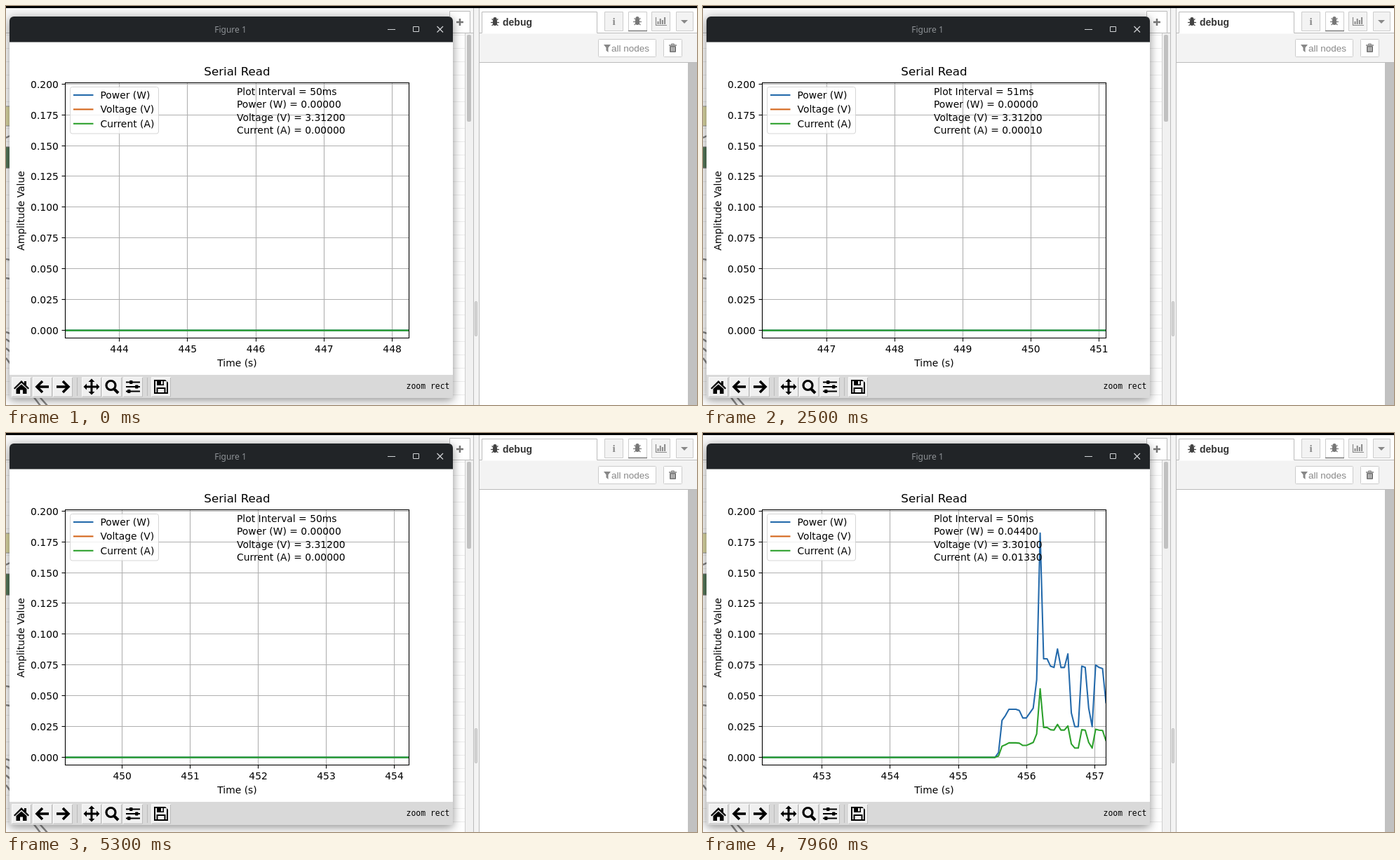
Write an HTML page with a canvas that moves like this. It is 985 px wide and 569 px high and loops after 8000 ms.

```html
<!DOCTYPE html>
<html lang="en">
<head>
<meta charset="utf-8">
<title>Serial Read</title>
<style>
  html, body { margin: 0; width: 100%; height: 100%; overflow: hidden; background: #fff; }
  canvas { display: block; }
</style>
</head>
<body>
<canvas id="stage" width="985" height="569"></canvas>
<script>
const ctx = document.getElementById('stage').getContext('2d');
const LOOP = 8000;
const PLOT = { left: 84.5, right: 574.5, top: 109.5, bottom: 473.5 };
const BLUE = '#246aab', ORANGE = '#d3651a', GREEN = '#2ca02c';
const SANS = '"DejaVu Sans", sans-serif', UI = '"Liberation Sans", Arial, sans-serif';

// [loop ms, sample index, time at the right edge in s, pixels per second]
const KEYS = [
  [0, 0, 448.246, 97.25], [1030, 24, 449.466, 97.2], [2500, 56, 451.104, 97.1],
  [4090, 91, 452.898, 96.9], [5300, 117, 454.217, 96.95], [6440, 142, 455.487, 97],
  [7960, 175, 457.164, 97.25]
];
const LOAD_START = 144;
const LOAD_MW = [4, 30, 34, 39, 39, 39, 38, 32, 32, 36, 40, 63, 182, 80, 80, 74, 73, 88,
  73, 73, 84, 36, 25, 25, 74, 73, 40, 25, 75, 73, 72, 44];

// Interpolates column `to` of KEYS by column `from`.
function track(value, from, to) {
  let i = 1;
  while (i < KEYS.length - 1 && value >= KEYS[i][from]) i++;
  const a = KEYS[i - 1], b = KEYS[i];
  const f = Math.min(1, (value - a[from]) / (b[from] - a[from]));
  return a[to] + f * (b[to] - a[to]);
}

function sample(step) {
  const power = (LOAD_MW[step - LOAD_START] || 0) / 1000;
  const voltage = 3.312 - power / 4;
  const noise = step % 9 % 4 ? 0.0001 : 0;
  return { power, voltage, current: power ? power / voltage : noise };
}

function box(x, y, w, h, fill, stroke, radius = 0) {
  ctx.beginPath();
  ctx.roundRect(x, y, w, h, radius);
  if (fill) { ctx.fillStyle = fill; ctx.fill(); }
  if (stroke) { ctx.strokeStyle = stroke; ctx.lineWidth = 1; ctx.stroke(); }
}

function line(points, color, width = 1) {
  ctx.beginPath();
  for (let i = 0; i < points.length; i += 2) ctx.lineTo(points[i], points[i + 1]);
  ctx.strokeStyle = color;
  ctx.lineWidth = width;
  ctx.stroke();
}

function shape(points, color) {
  ctx.beginPath();
  for (let i = 0; i < points.length; i += 2) ctx.lineTo(points[i], points[i + 1]);
  ctx.fillStyle = color;
  ctx.fill();
}

function text(str, x, y, size, color = '#000', align = 'left', family = SANS, weight = '') {
  ctx.font = `${weight} ${size}px ${family}`;
  ctx.textAlign = align;
  ctx.fillStyle = color;
  ctx.fillText(str, x, y);
}

function bug(x, y, color) {
  ctx.fillStyle = color;
  ctx.beginPath();
  ctx.ellipse(x, y + 1.5, 3.2, 4.5, 0, 0, 7);
  ctx.arc(x, y - 3.5, 2.6, 0, 7);
  ctx.fill();
  for (const side of [-1, 1]) {
    line([x, y + 1.5, x + side * 6, y + 1.5], color, 1.2);
    line([x, y, x + side * 4.5, y - 3.5], color, 1.2);
    line([x, y + 2.5, x + side * 4.5, y + 6], color, 1.2);
  }
}

function drawWorkspace() {
  box(0, 0, 985, 569, '#fff');
  for (let y = 41.5; y < 569; y += 19) line([0, y, 655, y], '#ececec');
  box(0, 3, 666, 35, '#f7f7f7');
  line([0, 38.5, 666, 38.5], '#bbb');
  box(632.5, 7.5, 29, 31, '#fff', '#bbb');
  line([642, 23, 652, 23], '#777', 2.5);
  line([647, 18, 647, 28], '#777', 2.5);
  box(-8, 143, 16, 28, '#dedaa5', '#999', 3);
  box(-8, 201, 16, 30, '#55795a', '#777', 3);
  for (const [y, slope] of [[188, -3], [361, 1], [388, 1], [465, 2], [475, 4], [488, 5], [502, 8]])
    line([0, y, 6, y + slope], '#888', 2.5);
  line([36, 553, 49, 570], '#888', 2.5);
  line([44, 553, 59, 570], '#888', 2.5);
  box(655, 39, 11, 530, '#f1f1f1');
  line([654.5, 39, 654.5, 569], '#ccc');
  box(657, 41, 6, 124, '#c1c1c1', null, 2);
  box(666, 3, 9, 566, '#f3f3f3');
  line([666.5, 3, 666.5, 569], '#bbb');
  line([674.5, 3, 674.5, 569], '#bbb');
  box(668.5, 421.5, 3, 49, '#d8d8d8', '#bbb', 1);
}

function drawSidebar() {
  box(675, 3, 310, 36, '#fff');
  box(675, 39, 310, 41, '#f3f3f3');
  line([675, 38.5, 985, 38.5], '#bbb');
  line([675, 80.5, 985, 80.5], '#bbb');
  box(678.5, 8.5, 164, 31, '#fff');
  line([678.5, 38.5, 678.5, 8.5, 842.5, 8.5, 842.5, 38.5], '#bbb');
  bug(697, 22, '#444');
  text('debug', 708, 28, 14, '#333', 'left', UI, 'bold');

  for (const x of [853.5, 887.5, 920.5, 955.5])
    box(x, 8.5, x > 950 ? 24 : 26, 27, x === 887.5 ? '#fff' : '#f3f3f3', '#ccc');
  line([887, 35.5, 914, 35.5], '#777', 1.5);
  text('i', 866.5, 27, 15, '#888', 'center', '"Liberation Serif", serif', 'bold');
  bug(900, 21, '#777');
  line([926.5, 16, 926.5, 27.5, 942, 27.5], '#888', 1.2);
  [4, 8, 6, 10].forEach((h, i) => box(928.5 + i * 3.2, 26 - h, 2, h, '#888'));
  shape([962, 20, 972, 20, 967, 25], '#888');

  box(844.5, 47.5, 82, 25, '#fff', '#ccc', 1);
  shape([852, 55, 862, 55, 858.5, 59.5, 858.5, 66, 855.5, 63.5, 855.5, 59.5], '#888');
  text('all nodes', 863, 64.5, 13.5, '#888', 'left', UI);
  box(937.5, 47.5, 26, 25, '#fff', '#ccc', 1);
  box(946, 57, 9, 9, '#777', null, 1);
  line([945, 56, 956, 56], '#777', 1.4);
  line([948.5, 55.5, 949, 54, 952, 54, 952.5, 55.5], '#777', 1.2);
  for (const x of [948.5, 950.5, 952.5]) line([x, 58.5, x, 64.5], '#fff', 0.8);
  box(972, 81, 13, 488, '#c1c1c1');
}

function drawToolbar() {
  box(5, 526, 632, 33, '#d9d9d9');
  for (const x of [22, 52, 81, 122, 151, 181, 221]) {
    box(x - 13.5, 529.5, 27, 27, '#f0f0f0', '#fafafa');
    line([x - 13, 557, x + 13.5, 557, x + 13.5, 530], '#bbb');
  }
  for (const x of [101.5, 201.5]) line([x, 530, x, 556], '#bbb');

  shape([11, 545, 22, 534, 26, 538, 26, 535, 29, 535, 29, 541, 33, 545, 31.5, 546.5, 22, 537.5, 12.5, 546.5], '#000');
  shape([14.5, 546, 22, 539.5, 29.5, 546, 29.5, 553, 24, 553, 24, 547.5, 20, 547.5, 20, 553, 14.5, 553], '#000');
  for (const [x, dir] of [[52, -1], [81, 1]]) {
    line([x - dir * 9, 543, x + dir * 7, 543], '#000', 3.6);
    line([x, 535, x + dir * 8, 543, x, 551], '#000', 3.6);
  }
  line([114, 543, 130, 543], '#000', 3);
  line([122, 535, 122, 551], '#000', 3);
  for (let i = 0; i < 4; i++) {
    ctx.save();
    ctx.translate(122, 543);
    ctx.rotate(i * Math.PI / 2);
    shape([-4.5, -7, 0, -11.5, 4.5, -7], '#000');
    ctx.restore();
  }
  ctx.beginPath();
  ctx.arc(149.5, 541, 6.5, 0, 7);
  ctx.lineWidth = 3.2;
  ctx.stroke();
  line([154, 546, 160, 552], '#000', 4);
  for (const [y, knob] of [[536.5, 178], [543, 186], [549.5, 175]]) {
    line([171, y, 191, y], '#000', 2);
    box(knob - 2, y - 2.5, 4.5, 5, '#000', null, 1);
  }
  shape([211, 533, 227, 533, 231, 537, 231, 553, 211, 553], '#000');
  box(213, 535, 16, 16, '#f0f0f0');
  box(215, 534, 10, 7, '#000');
  box(221, 535, 2.5, 4.5, '#f0f0f0');
  box(214.5, 544, 13, 8, '#000');
  box(216.5, 546, 9, 5, '#f0f0f0');
  text('zoom rect', 570.5, 546, 11.45, '#000', 'left', '"DejaVu Sans Mono", monospace');
}

function drawWindow() {
  ctx.save();
  ctx.shadowColor = 'rgba(0,0,0,.45)';
  ctx.shadowBlur = 14;
  ctx.shadowOffsetY = 3;
  box(5, 15, 632, 544, '#fff', null, [6, 6, 0, 0]);
  ctx.restore();
  box(5, 15, 632, 36.5, '#212427', null, [6, 6, 0, 0]);
  text('Figure 1', 320, 38, 12, '#8d9195', 'center', '"Noto Sans", sans-serif');
  const light = '#d0d3d5';
  line([544, 33.5, 555, 33.5], light);
  box(580.5, 29.5, 8, 7, null, light);
  line([614.5, 29, 623, 37.5], light, 1.2);
  line([623, 29, 614.5, 37.5], light, 1.2);
  drawToolbar();
}

const valueY = v => 462.6 - v * 1757;
const snap = v => Math.floor(v) + 0.5;

function drawPlot(ms) {
  const step = Math.floor(track(ms, 0, 1) + 0.1);
  const end = track(step, 1, 2), scale = track(step, 1, 3);
  const { left, right, top, bottom } = PLOT;
  const timeX = s => right - (end - s) * scale;

  for (let s = Math.ceil(end - (right - left) / scale); s <= end; s++) {
    const x = snap(timeX(s));
    line([x, top, x, bottom], '#b0b0b0', 1.1);
    line([x, bottom, x, bottom + 5], '#000', 1.1);
    text(s, timeX(s), 494, 13.89, '#000', 'center');
  }
  for (let i = 0; i <= 8; i++) {
    const y = snap(valueY(i / 40));
    line([left, y, right, y], '#b0b0b0', 1.1);
    line([left - 5, y, left, y], '#000', 1.1);
    text((i / 40).toFixed(3), 74.8, y + 5, 13.89, '#000', 'right');
  }

  ctx.save();
  ctx.beginPath();
  ctx.rect(left, top, right - left, bottom - top);
  ctx.clip();
  ctx.lineJoin = 'round';
  for (const [key, color] of [['power', BLUE], ['current', GREEN]]) {
    const points = [left, valueY(0)];
    for (let k = Math.min(step, LOAD_START - 1); k <= step; k++)
      points.push(timeX(track(k, 1, 2)), valueY(sample(k)[key]));
    line(points, color, 2.08);
  }
  ctx.restore();
  ctx.strokeStyle = '#000';
  ctx.lineWidth = 1.1;
  ctx.strokeRect(left, top, right - left, bottom - top);

  const now = sample(step);
  const notes = [
    `Plot Interval = ${step % 6 === 2 ? 51 : 50}ms`,
    `Power (W) = ${now.power.toFixed(5)}`,
    `Voltage (V) = ${now.voltage.toFixed(3)}00`,
    `Current (A) = ${now.current.toFixed(4)}0`
  ];
  notes.forEach((note, i) => text(note, 329, 126.5 + i * 18.5, 13.89));

  box(91.5, 115.5, 126, 66.5, 'rgba(255,255,255,.8)', 'rgba(204,204,204,.8)', 3);
  [['Power (W)', BLUE], ['Voltage (V)', ORANGE], ['Current (A)', GREEN]].forEach(([label, color], i) => {
    const y = 127 + i * 20.4;
    line([96, y, 124.5, y], color, 2.08);
    text(label, 134.5, y + 5, 13.89);
  });

  text('Serial Read', 329.5, 99, 16.67, '#000', 'center');
  text('Time (s)', 329.5, 513.5, 13.89, '#000', 'center');
  ctx.save();
  ctx.translate(26, 292);
  ctx.rotate(-Math.PI / 2);
  text('Amplitude Value', 0, 0, 13.89, '#000', 'center');
  ctx.restore();
}

function frame() {
  drawWorkspace();
  drawSidebar();
  drawWindow();
  drawPlot(performance.now() % LOOP);
  box(0, 0, 985, 3, '#000');
  requestAnimationFrame(frame);
}
frame();
</script>
</body>
</html>
```
